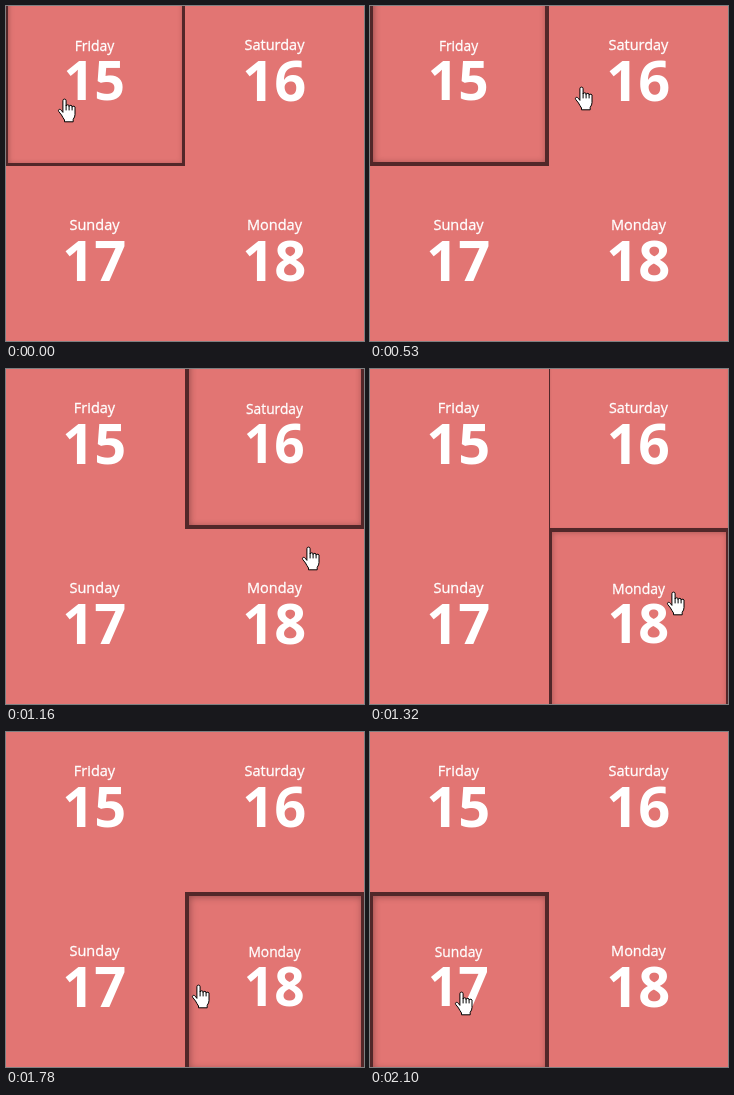
Write an HTML page that moves like this. It is 358 px wide and 335 px high and loops after 2.17 s.

```html
<!DOCTYPE html>
<html lang="en">
<head>
<meta charset="utf-8">
<title>Day picker</title>
<style>
  html, body { margin: 0; width: 100%; height: 100%; overflow: hidden; background: #e27573; }
  #stage { position: relative; width: 358px; height: 335px; overflow: hidden; background: #e27573; }
  .cell { position: absolute; width: 180px; height: 180px; }
  svg { position: absolute; left: 0; top: 0; display: block; }
  text { fill: #fff; text-anchor: middle; font-family: "Open Sans", "Noto Sans", sans-serif; }
  .name { font-size: 14.5px; stroke: #fff; stroke-width: 0.3px; }
  .num { font-size: 56px; font-weight: 700; }
</style>
</head>
<body>
<div id="stage"></div>
<script>
const LOOP = 2170, FRAME = 77.8, LEAD = 15, FADE = 400, CELL = 180;
const stage = document.getElementById('stage');

// Each day is hovered from its enter time until the next one is entered.
const visits = [
  { name: 'Friday', slot: 0, enter: -195 },
  { name: 'Saturday', slot: 1, enter: 520 },
  { name: 'Monday', slot: 3, enter: 1140 },
  { name: 'Sunday', slot: 2, enter: 1795 },
];

const linear = u => u;
const easeIn = u => u ** 1.5;
const easeOut = u => 1 - (1 - u) ** 2;

// Pointer stops; ease shapes the move that ends at the stop.
const stops = [
  { t: -LEAD, x: 59, y: 93 },
  { t: 529, x: 59, y: 93, ease: linear },
  { t: 529, x: 212, y: 81, ease: linear },
  { t: 840, x: 282, y: 81, ease: easeOut },
  { t: 1010, x: 282, y: 81, ease: linear },
  { t: 1152, x: 303, y: 178, ease: linear },
  { t: 1463, x: 304, y: 238, ease: easeOut },
  { t: 1541, x: 304, y: 238, ease: linear },
  { t: 1774, x: 193, y: 253, ease: easeIn },
  { t: 2085, x: 92, y: 260, ease: easeOut },
];

visits.forEach((day, i) => {
  const el = document.createElement('div');
  el.className = 'cell';
  el.style.left = (day.slot % 2) * CELL - 1 + 'px';
  el.style.top = Math.floor(day.slot / 2) * CELL - 20 + 'px';
  el.innerHTML = `<svg width="${CELL}" height="${CELL}"><g>
    <text class="name" x="89.5" y="64">${day.name}</text>
    <text class="num" x="89.2" y="115.4">${15 + day.slot}</text></g></svg>`;
  stage.append(el);
  day.el = el;
  day.label = el.querySelector('g');
  day.leave = visits[i + 1]?.enter ?? LOOP;
});

stage.insertAdjacentHTML('beforeend', `<svg width="358" height="335">
  <g id="hand" stroke="#000" stroke-linejoin="round" stroke-linecap="round">
    <path fill="#fff" d="M-1.6 13V1.7a1.6 1.6 0 0 1 3.2 0V7a1.5 1.4 0 0 1 3 .4
      a1.5 1.4 0 0 1 3 .7a1.5 1.4 0 0 1 2.9 1V15.5q0 2.5-1.8 4.8V22.8H0V21
      Q-1.6 18.6-3 16L-5.8 12.4C-6.8 10.4-4.6 9.6-3.4 11Z"/>
    <path fill="none" d="M1.6 7V11M4.6 7.4V11M7.6 8.1V11"/>
  </g></svg>`);
const hand = document.getElementById('hand');

// CSS "ease" curve, solved by bisection.
function fade(x) {
  if (x <= 0) return 0;
  if (x >= 1) return 1;
  const bezier = (a, b, s) => 3 * a * s * (1 - s) ** 2 + 3 * b * s * s * (1 - s) + s ** 3;
  let lo = 0, hi = 1;
  for (let i = 0; i < 24; i++) {
    const mid = (lo + hi) / 2;
    if (bezier(0.25, 0.25, mid) < x) lo = mid; else hi = mid;
  }
  return bezier(0.1, 1, lo);
}

function pointerAt(t) {
  const i = stops.findIndex(stop => stop.t > t);
  if (i < 0) return stops.at(-1);
  const a = stops[i - 1], b = stops[i];
  const k = b.ease((t - a.t) / (b.t - a.t));
  return { x: a.x + (b.x - a.x) * k, y: a.y + (b.y - a.y) * k };
}

function draw(t) {
  for (const { el, label, enter, leave } of visits) {
    const p = fade((t - enter) / FADE) - fade((t - leave) / FADE);
    const edge = Math.round(4 * p);
    el.style.boxShadow = edge
      ? `inset 0 0 0 ${edge}px #522729, inset ${p}px ${p}px ${7 * p}px ${edge}px rgba(82, 39, 41, ${0.5 * p})`
      : 'none';
    label.setAttribute('transform', `translate(90 90) scale(${1 - 0.05 * p}) translate(-90 -90)`);
  }
  const { x, y } = pointerAt(t);
  hand.setAttribute('transform', `translate(${Math.round(x) - 0.5} ${Math.round(y)})`);
}

// The picture advances in even steps.
const start = performance.now();
function loop() {
  const t = (performance.now() - start) % LOOP;
  draw(Math.floor((t + LEAD) / FRAME) * FRAME - LEAD);
  requestAnimationFrame(loop);
}
draw(-LEAD);
requestAnimationFrame(loop);
</script>
</body>
</html>
```
